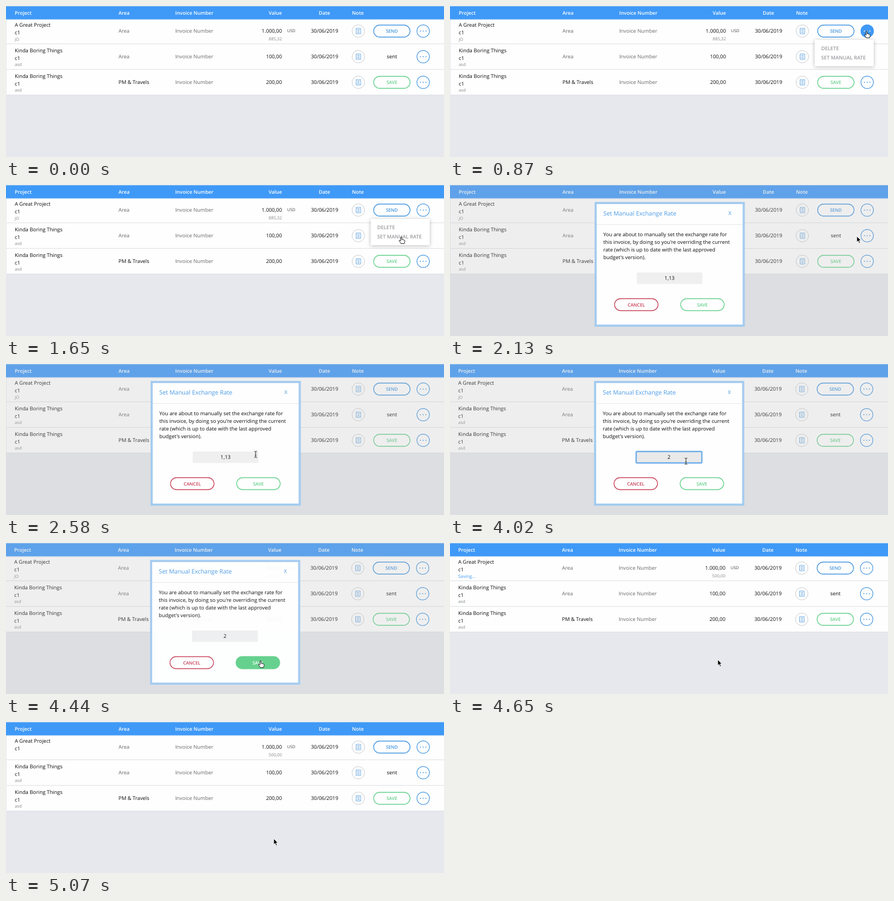
These frames come from a looping animation (800x277 px, 5100 ms). An HTML page:

```html
<!DOCTYPE html>
<html lang="en">
<head>
<meta charset="utf-8">
<title>Invoice table</title>
<style>
html, body { margin: 0; width: 100%; height: 100%; overflow: hidden; background: #e6e8ed; }
svg { display: block; width: 800px; height: 277px; }
text { font: 9.4px "Open Sans", "Noto Sans", sans-serif; text-rendering: geometricPrecision; fill: #0c0c0e; white-space: pre; }
.head text { font-size: 9.1px; font-weight: 600; fill: #fff; }
.grey { fill: #66686b; }
.small { font-size: 7.8px; fill: #85878a; }
.usd { font-size: 7.5px; fill: #444; }
.saving { font-size: 8.3px; fill: #3f99f7; }
.end { text-anchor: end; }
.mid { text-anchor: middle; }
.btn rect { fill: none; stroke: currentColor; stroke-width: 1.3; }
.btn text { font-size: 8.3px; font-weight: 600; fill: currentColor; text-anchor: middle; }
.btn .full { fill: currentColor; }
.btn .full + text { fill: #fff; }
.blue { color: #4295e0; }
.green { color: #62d08a; }
.red { color: #c73e55; }
.menu text { font-size: 9.2px; font-weight: 600; fill: #999b9f; }
.menu rect { filter: drop-shadow(0 1px 3px rgba(0,0,0,.28)); }
.title { font-size: 10.9px; fill: #4a9be6; }

/* one loop: 1% = 51 ms */
.anim { animation: 5.1s step-end infinite; }
.page { animation-name: nudge; }
.hot { animation-name: hot; }
.menu { animation-name: menu; }
.modal { animation-name: modal; animation-timing-function: linear; }
.focus { animation-name: focus; }
.pick { animation-name: pick; }
.before { animation-name: before; }
.typed { animation-name: typed; }
.press { animation-name: press; }
.saving { animation-name: saving; }
.oldRate { animation-name: oldRate; }
.newRate { animation-name: newRate; }
.cursor { animation-name: move; animation-timing-function: ease-in-out; }
.arrow { animation-name: arrow; }
.hand { animation-name: hand; }
.beam { animation-name: beam; }

@keyframes nudge { 0%, 97% { transform: none } 75.5% { transform: translateX(-1px) } }
@keyframes hot { 0%, 22% { opacity: 0 } 10% { opacity: 1 } }
@keyframes menu { 0%, 34.4% { opacity: 0 } 14% { opacity: 1 } }
@keyframes modal { 0%, 34.4%, 89.4%, 100% { opacity: 0 } 36.9%, 87% { opacity: 1 } }
@keyframes focus { 0%, 87% { opacity: 0 } 54.9% { opacity: 1 } }
@keyframes pick { 0%, 70.6% { opacity: 0 } 58.8% { opacity: 1 } }
@keyframes before { 0% { opacity: 1 } 70.6%, 100% { opacity: 0 } }
@keyframes typed { 0% { opacity: 0 } 70.6%, 100% { opacity: 1 } }
@keyframes press { 0%, 89.4% { opacity: 0 } 82% { opacity: 1 } }
@keyframes saving { 0%, 96.5% { opacity: 0 } 89.8% { opacity: 1 } }
@keyframes oldRate { 0% { opacity: 1 } 89.8%, 100% { opacity: 0 } }
@keyframes newRate { 0% { opacity: 0 } 89.8%, 100% { opacity: 1 } }
@keyframes move {
  0%, .6% { transform: translate(730px, 192px) }
  10.6%, 19.6% { transform: translate(761px, 46px) }
  27.5%, 34.4% { transform: translate(722px, 95px) }
  41.2%, 43.1% { transform: translate(743px, 94px) }
  52.5% { transform: translate(430px, 172px) }
  61.8%, 68.6% { transform: translate(419px, 173px) }
  78.4%, 79% { transform: translate(431px, 178px) }
  83.5%, 87% { transform: translate(465px, 216px) }
  90.6%, 100% { transform: translate(489px, 214px) }
}
@keyframes arrow { 0%, 9.8%, 50.5%, 81.8% { opacity: 0 } .55%, 34.4%, 80.2%, 88%, 100% { opacity: 1 } }
@keyframes hand { 0%, 34.4%, 88% { opacity: 0 } 9.8%, 81.8% { opacity: 1 } }
@keyframes beam { 0%, 80.2% { opacity: 0 } 50.5% { opacity: 1 } }
</style>
</head>
<body>
<svg viewBox="0 0 800 277">
  <defs>
    <g id="dots"><circle cx="-5" r=".9"/><circle r=".9"/><circle cx="5" r=".9"/></g>
    <g id="tools">
      <circle cx="643.5" r="11.4" fill="#fff" fill-opacity=".4" stroke="#c6cacf"/>
      <path d="M639.5-5h8.4V5h-8.4zM641.5-2.5h4.4M641.5 0h4.4M641.5 2.5h4.4" fill="none" stroke="#5b9fdc" stroke-width=".9"/>
      <circle cx="762" r="11.4" fill="none" stroke="#4295e0" stroke-width="1.2"/>
      <use href="#dots" x="762" fill="#4295e0"/>
    </g>
  </defs>

  <rect width="800" height="277" fill="#e6e8ed"/>
  <g class="anim page">
    <rect x="1" y="24" width="810" height="139" fill="#fefefe"/>
    <path d="M1 69.3h810M1 116.3h810M1 163.2h810" stroke="#dcdee2"/>
    <rect y="24" width="810" height="1.6" fill="#cfe3f8"/>
    <rect y=".5" width="810" height="23.8" fill="#3f99f7"/>
    <g class="head">
      <text x="16" y="15.8">Project</text>
      <text x="205.5" y="15.8">Area</text>
      <text x="309" y="15.8">Invoice Number</text>
      <text x="504" y="15.8" class="end">Value</text>
      <text x="592" y="15.8" class="end">Date</text>
      <text x="632" y="15.8">Note</text>
    </g>

    <g>
      <text x="16" y="38.3">A Great Project</text>
      <text x="16" y="51.7">c1</text>
      <text x="16" y="63.6" class="small anim oldRate">JO</text>
      <text x="16" y="64" class="saving anim">Saving...</text>
      <text x="205.5" y="49.3" class="grey">Area</text>
      <text x="309" y="49.3" class="grey">Invoice Number</text>
      <text x="504" y="49.3" class="end">1.000,00</text>
      <text x="513.5" y="47.8" class="usd">USD</text>
      <text x="504" y="62.7" class="small end anim oldRate">885,32</text>
      <text x="504" y="62.7" class="small end anim newRate">500,00</text>
      <text x="557" y="49.3">30/06/2019</text>
      <use href="#tools" y="46"/>
      <g class="btn blue"><rect x="671.5" y="35" width="66.5" height="22" rx="11"/><text x="704.8" y="49">SEND</text></g>
      <g class="anim hot"><circle cx="762" cy="46" r="12" fill="#3f99f7"/><use href="#dots" x="762" y="46" fill="#fff"/></g>
    </g>

    <g>
      <text x="16" y="85.3">Kinda Boring Things</text>
      <text x="16" y="98.7">c1</text>
      <text x="16" y="110.2" class="small">asd</text>
      <text x="205.5" y="96.3" class="grey">Area</text>
      <text x="309" y="96.3" class="grey">Invoice Number</text>
      <text x="504" y="96.3" class="end">100,00</text>
      <text x="557" y="96.3">30/06/2019</text>
      <use href="#tools" y="93"/>
      <text x="705" y="96.3" class="mid">sent</text>
    </g>

    <g>
      <text x="16" y="132.3">Kinda Boring Things</text>
      <text x="16" y="145.7">c1</text>
      <text x="16" y="157.2" class="small">asd</text>
      <text x="205.5" y="143.3">PM &amp; Travels</text>
      <text x="309" y="143.3" class="grey">Invoice Number</text>
      <text x="504" y="143.3" class="end">200,00</text>
      <text x="557" y="143.3">30/06/2019</text>
      <use href="#tools" y="140"/>
      <g class="btn green"><rect x="671.5" y="129" width="66.5" height="22" rx="11"/><text x="704.8" y="143">SAVE</text></g>
    </g>

    <g class="anim menu">
      <rect x="666" y="62" width="108" height="48.5" fill="#fff"/>
      <text x="678" y="81">DELETE</text>
      <text x="678" y="97.8">SET MANUAL RATE</text>
    </g>

    <g class="anim modal">
      <rect width="810" height="277" fill="#bebebe" fill-opacity=".25"/>
      <rect x="264" y="31" width="274.5" height="229" fill="#a5ccf0"/>
      <rect x="268" y="35" width="266.5" height="221" fill="#fefefe"/>
      <path d="M268 72.5h266.5" stroke="#e4e6e8"/>
      <text x="280" y="56" class="title">Set Manual Exchange Rate</text>
      <text x="508.5" y="54.6" style="fill:#4295e0">X</text>
      <text x="280" y="93.7">You are about to manually set the exchange rate for</text>
      <text x="280" y="107.8">this invoice, by doing so you're overriding the current</text>
      <text x="280" y="121.9">rate (which is up to date with the last approved</text>
      <text x="280" y="136">budget's version).</text>
      <rect x="341" y="160.5" width="120" height="21" rx="2" fill="#efeff0"/>
      <rect class="anim focus" x="341" y="160.5" width="120" height="21" rx="1.5" fill="#e9e9ea" stroke="#6fadea" stroke-width="2.4"/>
      <rect class="anim pick" x="391.5" y="165" width="19" height="12.5" fill="#a6c9ee"/>
      <text x="401" y="174.4" class="mid anim before">1,13</text>
      <text x="401" y="174.4" class="mid anim typed">2</text>
      <g class="btn red"><rect x="300.5" y="208.5" width="79.5" height="22" rx="11"/><text x="340.2" y="222.6">CANCEL</text></g>
      <g class="btn green"><rect x="421.3" y="208.5" width="79.5" height="22" rx="11"/><text x="461" y="222.6">SAVE</text></g>
      <g class="btn green anim press"><rect class="full" x="421.3" y="208.5" width="79.5" height="22" rx="11"/><text x="461" y="222.6">SAVE</text></g>
    </g>
  </g>

  <g class="anim cursor" stroke-linejoin="round">
    <path class="anim arrow" d="M0 0v10.8l2.5-2.3 1.8 4.2 1.9-.8-1.8-4.1h3.4z" fill="#000" stroke="#fff" stroke-width=".9"/>
    <path class="anim hand" d="M-1 .8C-1-.4 1-.4 1 .8V5l1-.3q.9 0 1 .8 1.5-.6 1.9.6 1.6-.2 1.6 1.4c0 2-.8 3-1.2 5H-.6C-1.4 10.400-4 8-4 7c0-1 1.400-1.200 3 .6z" fill="#fff" stroke="#000" stroke-width=".9"/>
    <g class="anim beam" fill="none">
      <path id="stem" d="M-2.500-5.500Q0-5.500 0-4Q0-5.500 2.500-5.500M0-4V4.500M-2.500 6Q0 6 0 4.500Q0 6 2.500 6M-1.300 2h2.600" stroke="#fff" stroke-width="2"/>
      <use href="#stem" style="display:none"/>
      <path d="M-2.500-5.500Q0-5.500 0-4Q0-5.500 2.500-5.500M0-4V4.500M-2.500 6Q0 6 0 4.500Q0 6 2.500 6M-1.300 2h2.600" stroke="#111"/>
    </g>
  </g>
</svg>
</body>
</html>
```
